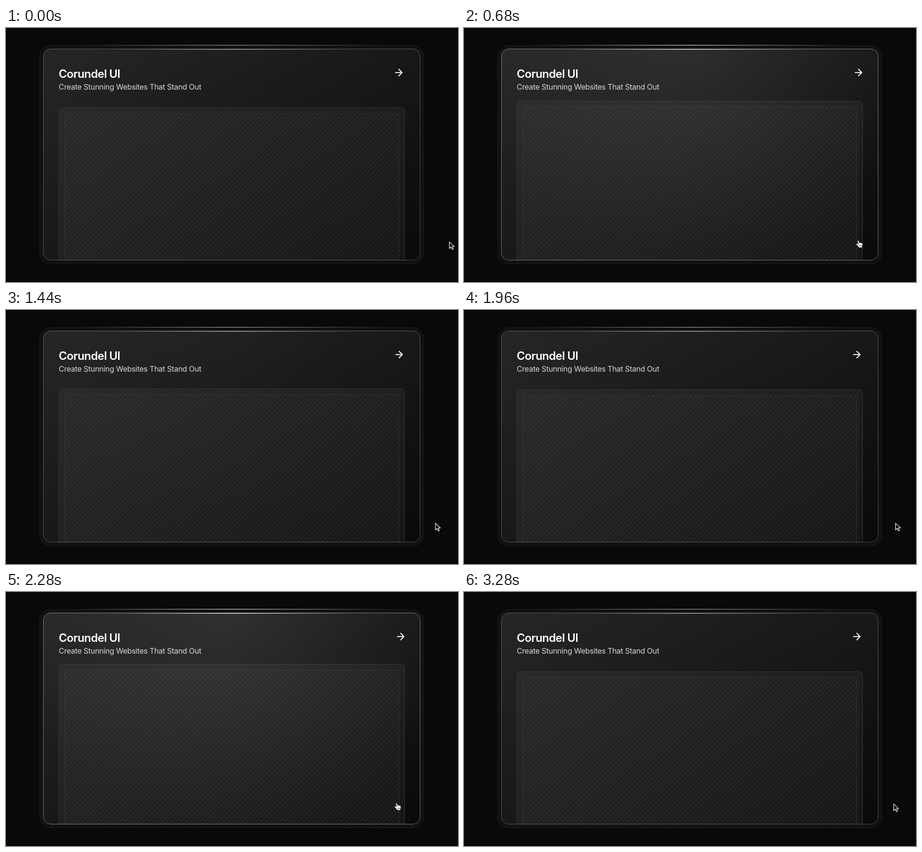
Animation of 960 by 540 pixels, one loop 3.68 s. Source, as an HTML page:

```html
<!DOCTYPE html>
<html lang="en">
<head>
<meta charset="utf-8">
<title>Card hover</title>
<style>
  html, body { margin: 0; width: 100%; height: 100%; overflow: hidden; background: #090909; }
  body { --hover: 0; position: relative; }
  div, svg { position: absolute; box-sizing: border-box; }

  .ring {
    left: 71px; top: 37px; width: 817px; height: 465px;
    border: 1px solid #1d1d1d; border-radius: 24px; background: #111;
  }
  .card {
    left: 79px; top: 44px; width: 801px; height: 450px;
    border-radius: 16px; overflow: hidden;
    background: linear-gradient(to bottom right, #262626, #0a0a0a);
  }
  .outline {
    inset: 0; border-radius: 16px;
    border: 1px solid rgba(255, 255, 255, calc(.27 + .17 * var(--hover)));
  }
  .panel {
    left: 33px; top: 125px; width: 735px; height: 450px;
    border: 1px solid #363636; border-radius: 8px;
    background: linear-gradient(to bottom right, #2a2a2a, #151515 90%);
    transform: translateY(calc(-16px * var(--hover)));
  }
  .hatch {
    inset: 11px; border: 1px dashed #3c3c3c; border-radius: 4px;
    background: repeating-linear-gradient(315deg,
      rgba(255, 255, 255, .13) 0 1px, transparent 0 50%) 0 0 / 10px 10px;
  }
  .glow {
    inset: 0; opacity: var(--hover);
    background: radial-gradient(ellipse 500px 480px at 50% 0, rgba(255, 255, 255, .08), transparent);
  }
  .shine {
    height: 1px; opacity: calc(.68 + .32 * var(--hover));
    background: linear-gradient(to right, transparent, #fff, transparent);
  }
  .shine.outer { left: 140px; top: 36px; width: 680px; }
  .shine.inner { left: 220px; top: 45px; width: 520px; }

  svg { left: 0; top: 0; width: 960px; height: 540px; }
  text { font-family: Inter, sans-serif; }
  .title { font-size: 24px; font-weight: 600; letter-spacing: -.025em; fill: #fff; }
  .subtitle { font-size: 16px; letter-spacing: -.018em; fill: #d8d8d8; }
</style>
</head>
<body>
<div class="ring"></div>
<div class="card">
  <div class="panel"><div class="hatch"></div></div>
  <div class="glow"></div>
  <div class="outline"></div>
</div>
<div class="shine outer"></div>
<div class="shine inner"></div>
<svg viewBox="0 0 960 540">
  <text class="title" x="112" y="106">Corundel UI</text>
  <text class="subtitle" x="112" y="131">Create Stunning Websites That Stand Out</text>
  <path id="arrow" d="M5 12h14M12 5l7 7-7 7" fill="none" stroke="#fff"
    stroke-width="2" stroke-linecap="round" stroke-linejoin="round"/>
  <g id="cursor">
    <path id="pointer" d="M.6 .6V14.8L4.2 11.5L6.6 17L9 15.9L6.7 10.6H11.2Z"
      fill="#080808" stroke="#fff" stroke-width="1.2" stroke-linejoin="round"/>
    <g id="hand" stroke="#111" stroke-width=".8">
      <path fill="#fff" d="M-1.2 1.2C-1.6-.4 .8-1 1.4 .6L3 5C3.4 3.8 5 4 5.3 5C6 4 7.4 4.4 7.5 5.4C8.4 4.7 9.8 5.4 9.7 7C9.7 10 9 11 8.6 15H2C1 12.5-2 10.5-4 8C-4.6 6.6-3 5.6-1.6 6.6L.6 8Z"/>
      <path fill="none" d="M3.4 9.5v3M5.3 9.5v3M7.2 9.5v3"/>
    </g>
  </g>
</svg>
<script>
  const LOOP = 3680, STEP = 40, HOVER_TIME = 300;
  const byId = id => document.getElementById(id);
  const clamp = v => Math.min(1, Math.max(0, v));
  const easeInOut = k => k * k * (3 - 2 * k);
  const easeOut = k => 1 - (1 - k) ** 2;

  // Each move carries the cursor on from where the previous one ended.
  const home = { x: 941, y: 454 };
  const moves = [
    { start: 220, end: 720, x: 835, y: 452, ease: easeInOut },
    { start: 1120, end: 1600, x: 921, y: 453, ease: easeOut },
    { start: 1930, end: 2140, x: 829, y: 449, ease: easeInOut },
    { start: 2640, end: 3120, x: 912, y: 450, ease: easeOut }
  ];
  const hovers = [{ enter: 500, leave: 1260 }, { enter: 1990, leave: 2825 }];

  // cubic-bezier(.4, 0, .2, 1), solved for its parameter by bisection
  function transition(x) {
    if (x <= 0 || x >= 1) return clamp(x);
    let low = 0, high = 1, s;
    for (let i = 0; i < 20; i++) {
      s = (low + high) / 2;
      const bx = 1.2 * s * (1 - s) ** 2 + .6 * s * s * (1 - s) + s ** 3;
      if (bx < x) low = s; else high = s;
    }
    return easeInOut(s);
  }

  const cursorAt = t => moves.reduce((from, { start, end, x, y, ease }) => {
    const k = ease(clamp((t - start) / (end - start)));
    return { x: from.x + (x - from.x) * k, y: from.y + (y - from.y) * k };
  }, home);

  const hoverAt = t => hovers.reduce((sum, { enter, leave }) => sum
    + transition((t - enter) / HOVER_TIME) - transition((t - leave) / HOVER_TIME), 0);

  function draw(now) {
    const t = Math.floor(now % LOOP / STEP) * STEP;
    const hover = hoverAt(t), { x, y } = cursorAt(t);
    const inside = hovers.some(({ enter, leave }) => t >= enter && t < leave);
    document.body.style.setProperty('--hover', hover.toFixed(4));
    byId('arrow').setAttribute('transform', `translate(${822.3 + 4 * hover} 82.7)`);
    byId('cursor').setAttribute('transform', `translate(${x} ${y})`);
    byId('hand').style.display = inside ? '' : 'none';
    byId('pointer').style.display = inside ? 'none' : '';
  }

  const start = performance.now();
  function tick() {
    draw(performance.now() - start);
    requestAnimationFrame(tick);
  }
  tick();
</script>
</body>
</html>
```
